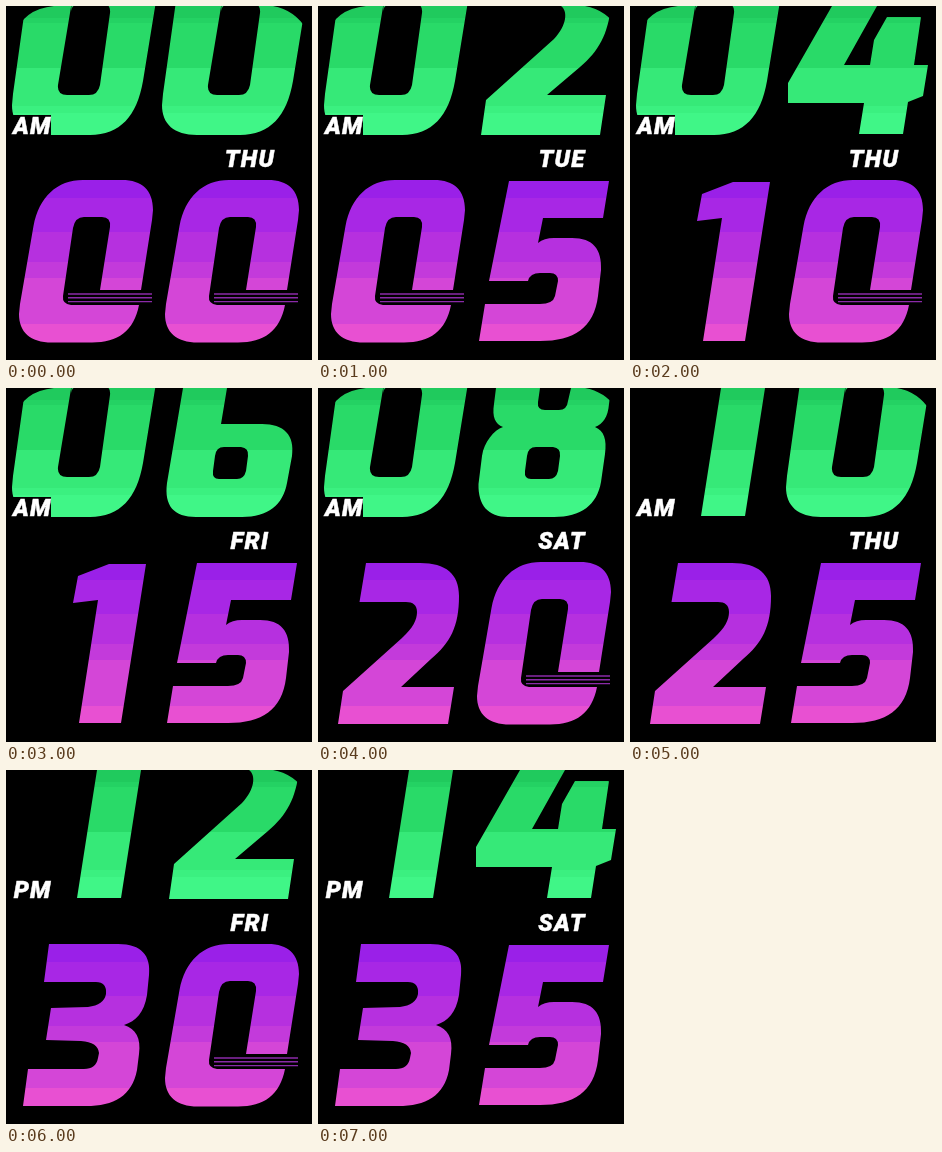
Recreate the animation shown at these times as an HTML page. Size 306x354 px, loop 8 s.

```html
<!DOCTYPE html>
<html lang="en">
<head>
<meta charset="utf-8">
<title>Watch face</title>
<style>
  html, body { margin: 0; width: 100%; height: 100%; overflow: hidden; background: #000; }
  svg { display: block; width: 306px; height: 354px; }
  text { font: italic 900 24px Roboto, Inter, sans-serif; letter-spacing: 1.3px; fill: #fff; stroke: #fff; stroke-width: .5; }
  #half { text-anchor: end; }
  #day { text-anchor: middle; }
  .hours path { fill: url(#green); fill-rule: evenodd; }
  .minutes path { fill: url(#purple); fill-rule: evenodd; }
  #stripes { stroke: #8a2aa8; stroke-width: 1.4; }
</style>
</head>
<body>
<svg viewBox="0 0 306 354">
  <defs>
    <linearGradient id="green" gradientUnits="userSpaceOnUse" x1="0" y1="0" x2="0" y2="129"></linearGradient>
    <linearGradient id="purple" gradientUnits="userSpaceOnUse" x1="0" y1="174" x2="0" y2="337"></linearGradient>
    <clipPath id="screen">
      <path d="M0 354V30H8Q17 3 48 0H267Q289 4 301 24L306 40V354Z"/>
    </clipPath>
    <g id="stripes"><path d="M62 288H146M62 291.8H146M62 295.6H146"/></g>
  </defs>
  <g class="hours" clip-path="url(#screen)">
    <path id="h1"/>
    <path id="h2"/>
  </g>
  <rect x="3" y="109" width="42" height="20"/>
  <g class="minutes">
    <path id="m1"/>
    <path id="m2"/>
  </g>
  <use id="s1" href="#stripes"/>
  <use id="s2" href="#stripes" x="146"/>
  <text id="half" x="45.8" y="127.7"></text>
  <text id="day" x="244" y="160.7"></text>
</svg>
<script>
const $ = id => document.getElementById(id);
const STEP = 1000, STEPS = 8;
const DAYS = ['THU', 'TUE', 'THU', 'FRI', 'SAT', 'THU', 'FRI', 'SAT'];

// Hour digits run past the top edge; x is the slot each outline is drawn in.
const HOUR = {
  0: { x: 6, d: 'M20 -5H150L137 75C131 110 114 129 84 129H41C18 129 6 118 6 99L7 88ZM66 -5L52 79Q51 89 61 89H83Q92 89 94 79L104 7Q105 -2 97 -2H74Q66 -2 65 5Z' },
  1: { x: 6, d: 'M91 0H135L115 128H71Z' },
  2: { x: 156, d: 'M243 0C250 5 249 19 236 33L168 94L163 129H282L288 89H229L262 61C281 45 290 28 293 0Z' },
  4: { x: 156, d: 'M202 0L158 77V97H234L229 128H273L278 96L293 90L298 59H284L291 11H257L244 34L240 59H214L247 0Z' },
  6: { x: 156, d: 'M177 0L161 95C158 118 168 129 190 129H236C262 129 277 117 281 95L286 68C289 47 278 36 256 36H215L221 0ZM218 59H235Q243 60 242 68L240 83Q238 91 231 91H213Q206 91 207 83L209 68Q210 59 218 59Z' },
  8: { x: 156, d: 'M178 0L176 16C174 29 177 36 185 39C176 42 166 54 164 68L160.5 96C160 117 170 129 190 129H236C263 129 279 117 283 94L287 66C289 51 286 43 277 39C285 36 290 29 291 16L293 0H253L250 13Q249 22 241 22H227Q219 22 220 14L222 0ZM218 59H235Q243 60 242 68L240 83Q238 91 231 91H213Q206 91 207 83L209 68Q210 59 218 59Z' }
};
const MINUTE = {
  0: { x: 13, d: 'M77 174H116C136 174 147 184 147 204L146 214L135 284H94L104 221Q105 211 96 211H78Q69 211 67 222L57 290Q56 298 65 299H133C128 325 112 336.5 86 336.5H46C24 336.5 13 326 13 308L14 298L27.5 220C33 191 51 174 77 174Z' },
  1: { x: 13, d: 'M103 176H140L115 335H73L92 212L67 215L72 188Z' },
  2: { x: 13, d: 'M48 175H102C128 175 141 186 141 208C141 239 132 255 113 271L83 299H136L130 336H20L25 303L84 250C95 240 99 232 99 224C99 217 95 214 88 214H41.5Z' },
  3: { x: 13, d: 'M43 174H112C136 174 145 186 143 205L141 225C138 243 130 251 118 255C130 259 135 268 133 284L131 300C126 326 108 336 80 336H17L22 299H78Q90 299 92 288L93 283Q92 272 75 271L40 270L45 238L82 237Q98 235 100 224Q101 212 90 212H38Z' },
  5: { x: 159, d: 'M191 175H291L285 212H225L220 237Q226 232 236 232H254C275 232 284 243 283 264L280 290C276 322 256 335 222 335H161L167 298H222Q235 298 237 290L240 275Q240 267 232 267H222Q212 267 210 275H171Z' }
};

// Flat colour bands, each given as [bottom y, colour].
function bands(id, top, list) {
  const end = list[list.length - 1][0];
  let from = 0;
  $(id).innerHTML = list.map(([y, c]) => {
    const to = (y - top) / (end - top);
    const stops = [from, to].map(o => `<stop offset="${o}" stop-color="${c}"/>`).join('');
    from = to;
    return stops;
  }).join('');
}
bands('green', 0, [[12, '#20ca5d'], [17, '#24d263'], [62, '#29da68'], [100, '#36e978'], [107, '#3bf080'], [129, '#40f687']]);
bands('purple', 174, [[192, '#9a20e8'], [226, '#a827e5'], [256, '#b630df'], [272, '#c33adb'], [318, '#d446d7'], [337, '#e850d2']]);

function put(id, glyph, x) {
  $(id).setAttribute('d', glyph.d);
  $(id).setAttribute('transform', `translate(${x - glyph.x})`);
}

function show(i) {
  const hour = 2 * i, minute = 5 * i;
  const tens = n => Math.floor(n / 10);
  put('h1', HOUR[tens(hour)], 6);
  put('h2', HOUR[hour % 10], 156);
  put('m1', MINUTE[tens(minute)], 13);
  put('m2', MINUTE[minute % 10], 159);
  $('s1').style.display = tens(minute) ? 'none' : '';
  $('s2').style.display = minute % 10 ? 'none' : '';
  $('half').textContent = hour < 12 ? 'AM' : 'PM';
  $('day').textContent = DAYS[i];
}

let shown = -1;
const start = performance.now();
function tick() {
  const i = Math.floor((performance.now() - start) / STEP) % STEPS;
  if (i !== shown) show(shown = i);
  requestAnimationFrame(tick);
}
tick();
</script>
</body>
</html>
```
